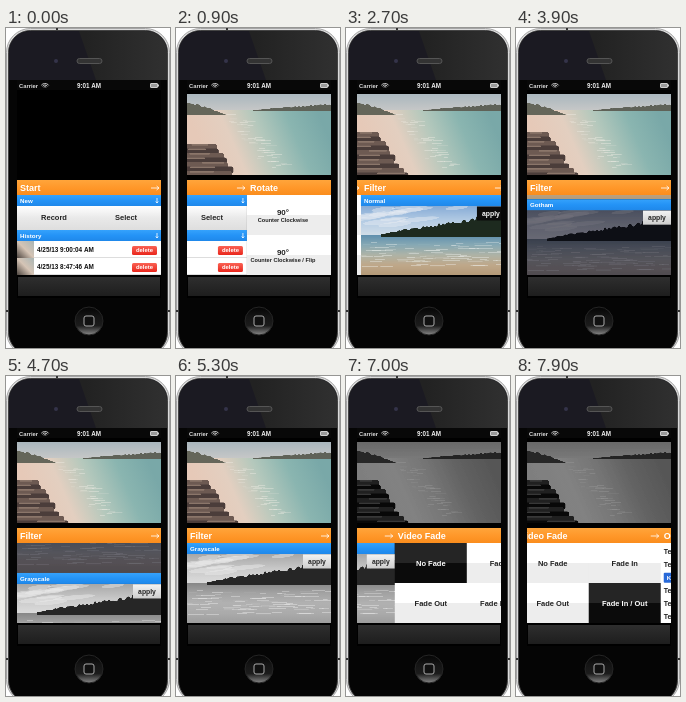
Animation of 164x320 px, one loop 8000 ms. Source, as an HTML page with a canvas:

```html
<!DOCTYPE html>
<html>
<head>
<meta charset="utf-8">
<style>
html, body { margin: 0; width: 100%; height: 100%; overflow: hidden; background: #fff; }
canvas { display: block; width: 164px; height: 320px; }
</style>
</head>
<body>
<canvas id="stage"></canvas>
<script>
const W = 164, H = 320, LOOP = 8000;
const LEFT = 11, PAGE = 144, TOP = 167, BOTTOM = 247, ROW = 80;
const PHOTO = 69, CLIP = 81, SCALE = 3;
const dpr = window.devicePixelRatio || 1;
const canvas = document.getElementById('stage');
canvas.width = W * dpr;
canvas.height = H * dpr;
let g = canvas.getContext('2d');

const clamp = v => Math.max(0, Math.min(1, v));
const span = (t, start, length) => clamp((t - start) / length);
const easeOut = (u, power) => 1 - (1 - u) ** power;

function random(seed) {
  return () => {
    seed = (seed * 16807) % 2147483647;
    return seed / 2147483647;
  };
}

function box(x, y, w, h, fill) {
  g.fillStyle = fill;
  g.fillRect(x, y, w, h);
}

function round(x, y, w, h, r, fill, line) {
  g.beginPath();
  g.roundRect(x, y, w, h, r);
  if (fill) { g.fillStyle = fill; g.fill(); }
  if (line) { g.strokeStyle = line; g.lineWidth = 1; g.stroke(); }
}

function blend(x0, y0, x1, y1, ...colors) {
  const grad = g.createLinearGradient(x0, y0, x1, y1);
  colors.forEach((c, i) => grad.addColorStop(i / (colors.length - 1), c));
  return grad;
}

const shade = (y, h, ...colors) => blend(0, y, 0, y + h, ...colors);

function text(s, x, y, size, color = '#fff', align = 'left') {
  g.font = `bold ${size}px "Liberation Sans", Arial, sans-serif`;
  g.textAlign = align;
  g.textBaseline = 'middle';
  g.fillStyle = color;
  g.fillText(s, x, y + 0.3);
}

function clipped(x, y, w, h, draw) {
  g.save();
  g.beginPath();
  g.rect(x, y, w, h);
  g.clip();
  draw();
  g.restore();
}

function arrow(x, y, size, down) {
  g.save();
  g.translate(x, y);
  if (down) g.rotate(Math.PI / 2);
  g.beginPath();
  g.moveTo(-size, 0);
  g.lineTo(size, 0);
  g.moveTo(size * 0.4, -size * 0.5);
  g.lineTo(size, 0);
  g.lineTo(size * 0.4, size * 0.5);
  g.strokeStyle = '#fff';
  g.lineWidth = 0.8;
  g.stroke();
  g.restore();
}

// Wooded skyline standing on a base line
function ridge(fill, x0, x1, base, rise) {
  const rand = random(77);
  g.beginPath();
  g.moveTo(x0, base);
  for (let x = x0; x <= x1; x += 2) {
    const h = rise((x - x0) / (x1 - x0));
    g.lineTo(x, base - h * (0.85 + 0.3 * rand()));
  }
  g.lineTo(x1, base);
  g.fillStyle = fill;
  g.fill();
}

function offscreen(h) {
  const c = document.createElement('canvas');
  c.width = PAGE * SCALE;
  c.height = h * SCALE;
  return c;
}

function paint(target, draw) {
  const main = g;
  g = target.getContext('2d');
  g.setTransform(SCALE, 0, 0, SCALE, 0, 0);
  draw();
  g = main;
}

// Still picture shown under each filter
const beach = offscreen(PHOTO);
paint(beach, () => {
  const rand = random(5);
  box(0, 0, PAGE, 30, shade(0, 30, '#86abd6', '#b4cce4', '#d3dee8'));
  for (let i = 0; i < 14; i++) {
    g.beginPath();
    g.ellipse(rand() * PAGE, rand() * 20, 8 + rand() * 14, 1 + rand() * 2, -0.1, 0, 7);
    g.fillStyle = 'rgba(230,236,242,.45)';
    g.fill();
  }
  box(0, 29, PAGE, 40, shade(29, 40, '#5f8fae', '#87a9b4', '#aeb3a6', '#bfa88a', '#b59a78'));
  ridge('#1d2a1f', 20, PAGE, 31, u => 3 + 20 * u);
  for (let i = 0; i < 90; i++) {
    const depth = rand();
    box(rand() * PAGE, 36 + depth * 24, 4 + rand() * 14, 0.5 + depth * 0.5, 'rgba(240,242,240,.4)');
  }
});

// Playing clip: sand on the left, sea on the right, ledges in the corner
const reel = offscreen(CLIP);
function paintReel(t) {
  const rand = random(9);
  const pan = 1 - easeOut(span(t, 1700, 1000), 2);
  box(0, 0, PAGE, 18, shade(0, 18, '#a9b6bd', '#c9c9c8'));
  box(0, 16, PAGE, CLIP, blend(18, 60, 128, 12, '#e6c9b8', '#e3cfc0', '#b4c8bc', '#8ab5b0', '#79a8a8'));
  ridge('#5f6258', 66, PAGE, 17, u => 1 + 6 * u);
  ridge('#65665a', 0, 40, 21, u => 14 * (1 - u));
  for (let i = 0; i < 45; i++) {
    const depth = rand(), sway = Math.sin(t / 500 + i) * 1.5;
    box(34 + depth * 45 + rand() * 22 + sway, 20 + depth * 58, 3 + rand() * 8, 0.8, 'rgba(240,238,230,.4)');
  }
  for (let i = 0; i < 10; i++) {
    const y = 38 + i * 4.5 + pan * 12, w = 22 + i * 3 + rand() * 8 + pan * 8;
    round(-4, y, w, 7, 2, i % 2 ? '#4b3d3a' : '#6d5a52');
    round(-4 + w * rand() * 0.5, y, w * 0.5, 1.6, 0.8, '#8b766a');
  }
}

function video(t) {
  paint(reel, () => paintReel(t));
  g.filter = t < 6450 ? 'none' : 'grayscale(1) brightness(.62) contrast(1.35)';
  g.drawImage(reel, LEFT, 66, PAGE, CLIP);
  g.filter = 'none';
}

function bar(x, y, label, down) {
  box(x, y, PAGE, 11, shade(y, 11, '#35a2fc', '#2493f6', '#1f88ea'));
  text(label, x + 3, y + 5.7, 6.2);
  if (down) arrow(x + 140, y + 5.5, 2.5, true);
}

function cell(x, col, row, lines, dark) {
  const left = x + col * 72, y = TOP + row * 40;
  box(left, y, 72.5, 20, dark ? '#252525' : '#fff');
  box(left, y + 20, 72.5, 20, dark ? '#0b0b0b' : '#ededed');
  const ink = dark ? '#fff' : '#222', mid = left + 36;
  if (lines.length > 1) {
    text(lines[0], mid, y + 17, 8, ink, 'center');
    text(lines[1], mid, y + 25, 5.6, ink, 'center');
  } else {
    text(lines[0], mid, y + 21, 7.5, ink, 'center');
  }
}

function startPage(x) {
  bar(x, 167, 'New', true);
  box(x, 178, PAGE, 24, shade(178, 24, '#fff', '#e9e9e9', '#dedede'));
  text('Record', x + 37, 190, 7.5, '#222', 'center');
  text('Select', x + 109, 190, 7.5, '#222', 'center');
  bar(x, 202, 'History', true);
  ['4/25/13 9:00:04 AM', '4/25/13 8:47:46 AM'].forEach((when, i) => {
    const y = 213 + i * 17;
    box(x, y, PAGE, 17, '#fff');
    box(x, y + 16.5, PAGE, 0.5, '#bbb');
    box(x, y, 17, 17, blend(x, y + 17, x + 17, y, '#4d453f', '#d5c4b5', '#a9b5b4'));
    text(when, x + 20, y + 9, 6.4, '#111');
    round(x + 115, y + 5, 25, 9, 1.5, shade(y + 5, 9, '#fa6254', '#e9261c'));
    text('delete', x + 127.5, y + 9.3, 5.9, '#fff', 'center');
  });
}

function rotatePage(x) {
  ['', ' / Flip'].forEach((flip, row) => {
    ['Counter Clockwise', 'Clockwise'].forEach((way, col) => cell(x, col, row, ['90°', way + flip]));
  });
}

const filters = [
  ['Normal', 'none'],
  ['Gotham', 'grayscale(.7) brightness(.55) contrast(1.15)'],
  ['Grayscale', 'grayscale(1)']
];

function filterPage(x, t) {
  const scroll = ROW * (easeOut(span(t, 3450, 720), 3) + easeOut(span(t, 4500, 720), 3));
  filters.forEach(([name, look], i) => {
    const y = TOP + i * ROW - scroll;
    if (y <= TOP - ROW || y >= BOTTOM) return;
    g.filter = look;
    g.drawImage(beach, x, y + 11, PAGE, PHOTO);
    g.filter = 'none';
    if (name === 'Gotham') box(x, y + 11, PAGE, PHOTO, 'rgba(55,50,95,.2)');
    bar(x, y, name);
    const picked = i === 0 || (i === 2 && t > 5500 && t < 5700);
    const w = 28;
    box(x + PAGE - w, y + 11.5, w, 14,
      picked ? '#0c0c0c' : shade(y + 11, 14, '#f4f4f4', '#cfcfcf'));
    text('apply', x + PAGE - w / 2, y + 18.7, 6.8, picked ? '#fff' : '#222', 'center');
  });
}

function fadePage(x, t) {
  const picked = t < 7620 ? 0 : 3;
  ['No Fade', 'Fade In', 'Fade Out', 'Fade In / Out'].forEach((name, i) =>
    cell(x, i % 2, i >> 1, [name], i === picked));
}

function overlayPage(x) {
  box(x, TOP, PAGE, 80, '#fff');
  for (let i = 0; i < 6; i++) {
    const y = 176 + i * 12.9;
    if (i === 2) {
      round(x + 3, y - 5, 14, 10, 1, '#2869d8');
      text('K', x + 6, y, 6);
    } else {
      text('Text', x + 3, y, 7, '#222');
    }
  }
}

const pages = [
  ['Start', startPage], ['Rotate', rotatePage], ['Filter', filterPage],
  ['Video Fade', fadePage], ['Overlay', overlayPage]
];
const slides = [500, 1758, 6450, 7860];

function panel(t) {
  const pos = slides.reduce((sum, start) => sum + easeOut(span(t, start, 1130), 2), 0);
  const each = draw => pages.forEach((page, i) => {
    if (Math.abs(i - pos) < 1) draw(page, LEFT + (i - pos) * PAGE);
  });
  clipped(LEFT, TOP, PAGE, 80, () => each(([, draw], x) => draw(x, t)));
  clipped(LEFT, 152, PAGE, 15, () => {
    box(LEFT, 152, PAGE, 15, shade(152, 15, '#ffa53b', '#ff982a', '#fa8d1d'));
    each(([title], x) => {
      text(title, x + 3, 160, 9);
      arrow(x + 138, 160, 4);
    });
  });
}

function statusBar() {
  box(LEFT, 52, PAGE, 10, '#080808');
  text('Carrier', 13, 57.8, 5.8, '#ddd');
  for (let i = 1; i < 4; i++) {
    g.beginPath();
    g.arc(39, 60.3, i * 1.6, -Math.PI * 0.78, -Math.PI * 0.22);
    g.strokeStyle = '#ccc';
    g.lineWidth = 1;
    g.stroke();
  }
  text('9:01 AM', 83, 57.8, 6.3, '#eee', 'center');
  round(144.5, 55.5, 7, 4, 0.5, '#999', '#ccc');
  box(152, 56.5, 1, 2, '#ccc');
}

function phone() {
  box(0, 0, W, H, '#fff');
  round(0.5, 0.5, 163, 327, 24, '#dcdcdc', '#a5a5a5');
  box(0, 282, W, 2, '#333');
  box(50, 0, 2, 3, '#333');
  round(2.5, 2.5, 159, 324, 22, '#050505', '#444');
  g.save();
  round(3, 3, 158, 323, 21);
  g.clip();
  box(0, 0, W, 52, '#1b1a22');
  g.beginPath();
  g.moveTo(72, 0);
  g.lineTo(W, 0);
  g.lineTo(W, 52);
  g.lineTo(90, 52);
  g.fillStyle = blend(80, 0, 160, 0, '#222', '#303030');
  g.fill();
  g.restore();
  round(71, 30.5, 25, 5, 2.5, '#333', '#555');
  g.beginPath();
  g.arc(50, 33, 2, 0, 7);
  g.fillStyle = '#34334a';
  g.fill();
  g.beginPath();
  g.arc(83, 293, 14, 0, 7);
  g.fillStyle = shade(279, 28, '#050505', '#141414', '#1c1c1c', '#888');
  g.fill();
  g.strokeStyle = '#252525';
  g.lineWidth = 1;
  g.stroke();
  round(78, 288, 10, 10, 2, '#111', '#aaa');
}

function busy(t) {
  const a = span(t, 5700, 200) * (1 - span(t, 6350, 150));
  if (!a) return;
  g.save();
  g.globalAlpha = a;
  box(LEFT, 62, PAGE, 208, 'rgba(0,0,0,.38)');
  round(74, 157, 18, 19, 3, 'rgba(70,65,65,.92)');
  g.translate(83, 166.5);
  const step = Math.floor(t / 83) % 12;
  for (let i = 0; i < 12; i++) {
    g.save();
    g.rotate(i * Math.PI / 6);
    g.globalAlpha = a * (0.25 + 0.75 * ((i - step + 12) % 12) / 11);
    box(-0.5, -5.5, 1, 3, '#fff');
    g.restore();
  }
  g.restore();
}

function draw(t) {
  g.setTransform(dpr, 0, 0, dpr, 0, 0);
  phone();
  box(LEFT, 52, PAGE, 218, '#000');
  statusBar();
  if (t >= 500) video(t);
  panel(t);
  box(LEFT + 1, BOTTOM + 2, PAGE - 2, 19, shade(BOTTOM, 23, '#303030', '#262626', '#1c1c1c'));
  busy(t);
}

const begin = performance.now();
function tick() {
  draw((performance.now() - begin) % LOOP);
  requestAnimationFrame(tick);
}
tick();
</script>
</body>
</html>
```
